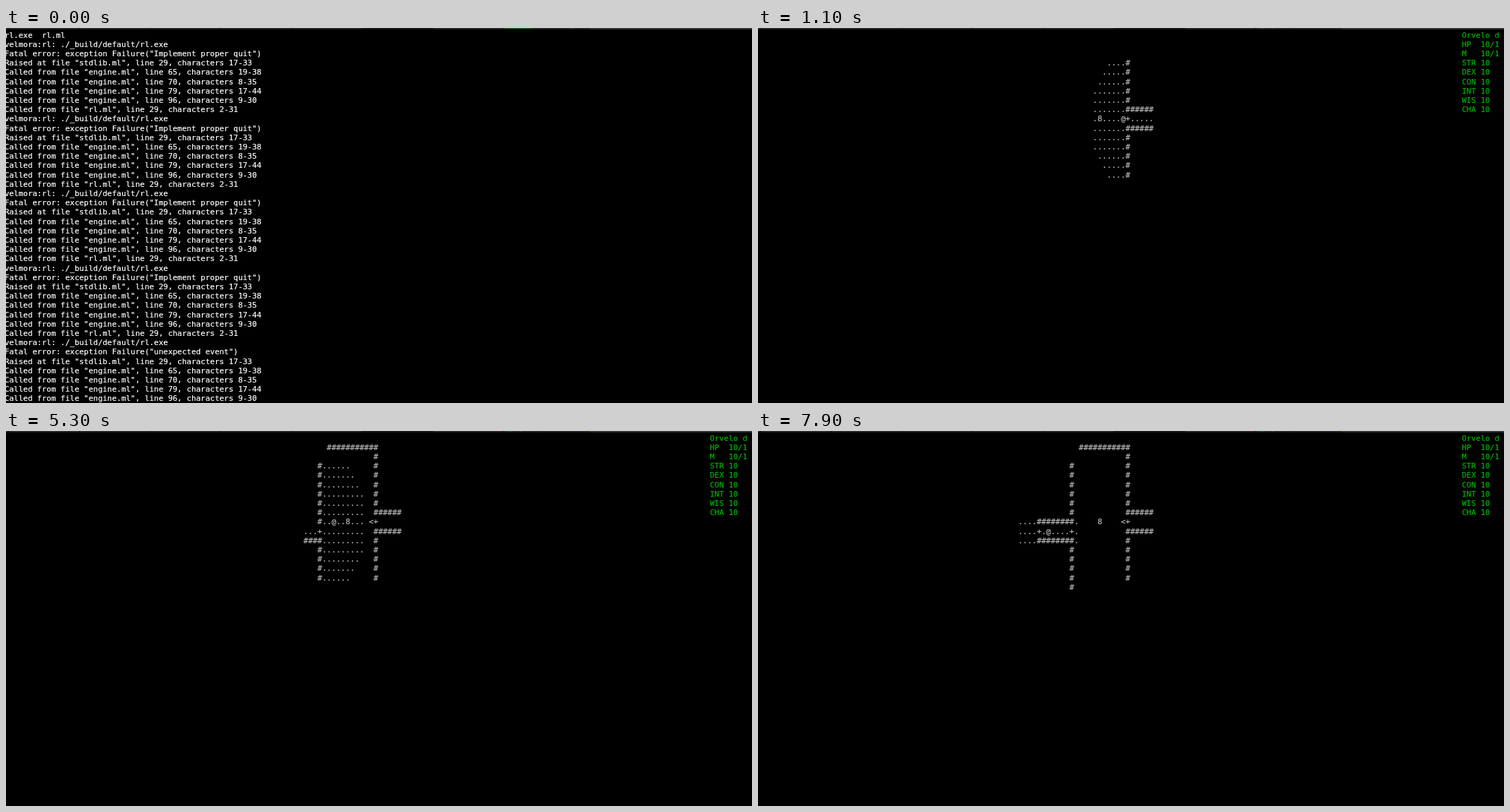
These frames come from a looping animation (1054 px wide and 531 px high, 8000 ms). An HTML page with a canvas:

```html
<!DOCTYPE html>
<html lang="en">
<head>
<meta charset="utf-8">
<title>Roguelike in a terminal</title>
<style>
  html, body { margin: 0; width: 100%; height: 100%; overflow: hidden; background: #000; }
  canvas { display: block; }
</style>
</head>
<body>
<canvas id="stage" width="1054" height="531"></canvas>
<script>
const ctx = document.getElementById('stage').getContext('2d');
const LOOP = 8000, CLEAR_AT = 700, GAME_AT = 800;
const CELL_W = 6.6, CELL_H = 13.2, LEFT = -2.1, BASELINE = 13.5;
const RADIUS = 6, RADIUS_SQ = 49;

// Terminal text
const crash = message => [
  'velmora:rl: ./_build/default/rl.exe',
  `Fatal error: exception Failure("${message}")`,
  'Raised at file "stdlib.ml", line 29, characters 17-33',
  ...[[65, '19-38'], [70, '8-35'], [79, '17-44'], [96, '9-30']].map(
    ([line, chars]) => `Called from file "engine.ml", line ${line}, characters ${chars}`),
  'Called from file "rl.ml", line 29, characters 2-31'
];
const terminal = ['rl.exe  rl.ml'];
for (let i = 0; i < 4; i++) terminal.push(...crash('Implement proper quit'));
terminal.push(...crash('unexpected event').slice(0, 7));

const stats = ['Orvelo d', 'HP  10/1', 'M   10/1',
  ...['STR', 'DEX', 'CON', 'INT', 'WIS', 'CHA'].map(name => name + ' 10')];

// Hero's walk: time, column, row
const walk = [
  [800, 78, 9], [2300, 77, 8],
  [4100, 76, 7], [4100, 75, 7], [4100, 74, 7], [4100, 73, 7],
  [4300, 72, 7], [5000, 71, 8], [5300, 70, 9], [5600, 69, 10],
  [6500, 68, 10], [6800, 67, 10], [7200, 66, 10], [7400, 65, 10],
  [7600, 64, 10], [7700, 63, 10], [7900, 62, 10]
];

const features = { '78,9': '<', '79,9': '+', '73,9': '8', '67,10': '+', '60,10': '+' };

function tileAt(x, y) {
  const feature = features[x + ',' + y];
  if (feature) return feature;
  const room = x > 67 && x < 79 && y > 1 && y < 20;
  const westRoom = x < 60 && y > 1 && y < 20;
  const eastHall = x > 79 && y === 9;
  const westHall = x > 60 && x < 67 && y === 10;
  return room || westRoom || eastHall || westHall ? '.' : '#';
}

// Recursive shadowcasting over one octant, given as a 2x2 transform
function castLight(cx, cy, octant, visit, depth = 1, start = 1, end = 0) {
  if (start < end) return;
  const [xx, xy, yx, yy] = octant;
  let blocked = false, nextStart = start;
  for (let j = depth; j <= RADIUS && !blocked; j++) {
    for (let i = j; i >= 0; i--) {
      const high = (i + 0.5) / (j - 0.5), low = (i - 0.5) / (j + 0.5);
      if (start < low) continue;
      if (end > high) break;
      const x = cx + i * xx + j * xy, y = cy + i * yx + j * yy;
      if (i * i + j * j < RADIUS_SQ) visit(x, y);
      if (tileAt(x, y) === '#') {
        if (!blocked) castLight(cx, cy, octant, visit, j + 1, start, high);
        blocked = true;
        nextStart = low;
      } else if (blocked) {
        blocked = false;
        start = nextStart;
      }
    }
  }
}

const octants = [];
for (const a of [-1, 1]) for (const b of [-1, 1]) octants.push([a, 0, 0, b], [0, a, b, 0]);

// One map per step: floor shows only in sight, everything else is remembered
const remembered = new Map();
const views = walk.map(([time, hx, hy]) => {
  const seen = new Map();
  for (const octant of octants) {
    castLight(hx, hy, octant, (x, y) => {
      const tile = tileAt(x, y);
      (tile === '.' ? seen : remembered).set(x + ',' + y, tile);
    });
  }
  const here = tileAt(hx, hy);
  if (here !== '.') remembered.set(hx + ',' + hy, here);
  return { time, cells: new Map([...remembered, ...seen, [hx + ',' + hy, '@']]) };
});

function setInk(color, weight) {
  ctx.fillStyle = ctx.strokeStyle = color;
  ctx.lineWidth = weight;
}

function print(text, col, row) {
  const y = BASELINE + row * CELL_H;
  [...text].forEach((char, i) => {
    if (char === ' ') return;
    const x = LEFT + (col + i) * CELL_W;
    ctx.fillText(char, x, y);
    ctx.strokeText(char, x, y);
  });
}

function bar(color, x, width, y = 0, height = 1) {
  ctx.fillStyle = color;
  ctx.fillRect(x, y, width, height);
}

function drawTopEdge(time) {
  bar('#2c2c2c', 0, 1054);
  bar('#202020', 0, 1054, 1);
  bar('#181818', 503, 100, 0, 2);
  bar('#343434', 827, 227, 0, 2);
  for (let i = 0; i < 8; i++) bar('#0c0c0c', 3 + i * 99.9, 1, 0, 2);
  if (time < 400) {
    bar('#146414', 703, 42);
    bar('#55550a', 798, 5);
  } else {
    bar('#146414', 710, 5);
    bar('#146414', 725, 4);
    bar('#10106a', 752, 2);
  }
  bar('#55550a', 825, 2);
}

function draw(time) {
  bar('#000', 0, 1054, 0, 531);
  ctx.font = '11px "DejaVu Sans Mono", "Noto Sans Mono", monospace';
  if (time < CLEAR_AT) {
    setInk('#fff', 0.2);
    terminal.forEach((line, row) => print(line, 0, row));
  } else if (time >= GAME_AT) {
    setInk('#c0c0c0', 0.15);
    const view = views.filter(v => v.time <= time).pop();
    for (const [place, char] of view.cells) print(char, ...place.split(',').map(Number));
    setInk('#00b800', 0.15);
    stats.forEach((line, row) => print(line, 151, row));
  }
  drawTopEdge(time);
}

const began = performance.now();
function tick() {
  draw((performance.now() - began) % LOOP);
  requestAnimationFrame(tick);
}
tick();
</script>
</body>
</html>
```
